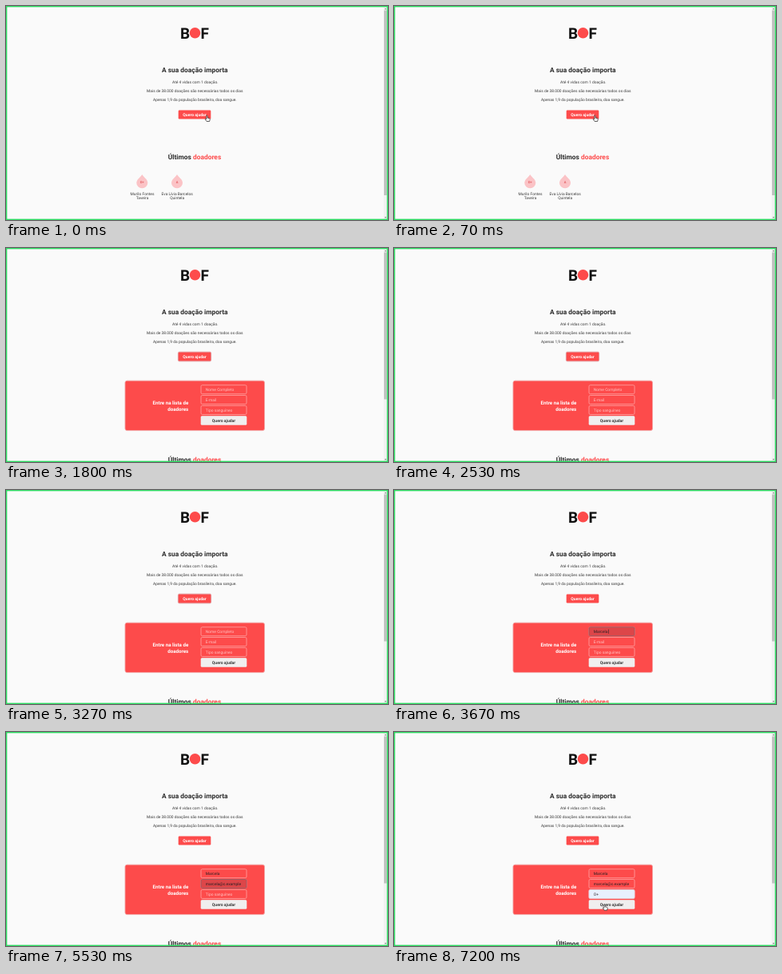
An HTML page that plays this animation: 478x268 px, repeating every 8 s.

```html
<!DOCTYPE html>
<html lang="pt-BR">
<head>
<meta charset="utf-8">
<title>Doadores</title>
<style>
  html, body { margin: 0; height: 100%; overflow: hidden; background: #fafafa; }
  svg { display: block; width: 478px; height: 268px; }
  text { font: 4.9px Roboto, sans-serif; fill: #3a3a3a; text-rendering: geometricPrecision; }
  .mid { text-anchor: middle; }
  .title { font-size: 8.4px; font-weight: 700; fill: #2b2b2b; }
  .logo { font-size: 19px; font-weight: 700; fill: #111; }
  .bold { font-size: 5.1px; font-weight: 700; }
  .lead { font-size: 6.2px; font-weight: 700; text-anchor: end; }
  .light { fill: #fff; }
  .hint { fill: #ffc4c4; }
  .value { fill: #2a2024; }
  .red { fill: #fd4b4b; }
  .blood { font-size: 4px; font-weight: 700; fill: #e25a5f; }
  .field { fill: none; stroke: #ffa3a3; stroke-width: .8; }
  .focus { fill: #dd4649; stroke: #8d5a63; }
  .filled { fill: #e8f0fe; stroke: #e3d5e2; }
</style>
</head>
<body>
<svg viewBox="0 0 478 268">
  <defs>
    <path id="drop" d="M0-8.5C2-5 7-2.5 7 2A7 6.7 0 0 1-7 2C-7-2.5-2-5 0-8.5Z" fill="#fbc3c6"/>
    <path id="hand" d="M-1.2 0Q-.5-.8.1 0V2.6L2.6 3.2Q3.4 3.5 3.2 4.6L2.6 7H-.9L-2.9 4.3Q-2.6 3.4-1.2 4.3Z"
      fill="#fff" stroke="#222" stroke-width=".7" stroke-linejoin="round"/>
    <rect id="box" width="57" height="11" rx="1.6"/>
  </defs>
  <rect width="478" height="268" fill="#fafafa"/>

  <text class="logo" x="218" y="40.5">B</text>
  <circle class="red" cx="236.5" cy="33.7" r="6.8"/>
  <text class="logo" x="243.6" y="40.5">F</text>

  <text class="title mid" x="236.3" y="83.3">A sua doação importa</text>
  <text class="mid" x="236.8" y="97">Até 4 vidas com 1 doação.</text>
  <text class="mid" x="236.3" y="108">Mais de 38.000 doações são necessárias todos os dias</text>
  <text class="mid" x="236.3" y="118.8">Apenas 1,9 da população brasileira, doa sangue.</text>

  <rect class="red" x="215.7" y="130.5" width="40.6" height="11" rx="1.2"/>
  <rect data-on="1" x="215.4" y="130.2" width="41.2" height="11.6" rx="1.4" fill="none" stroke="#d9757a" stroke-width=".7"/>
  <text class="bold light mid" x="236" y="137.7">Quero ajudar</text>

  <g id="donors">
    <text class="title mid" x="236" y="192">Últimos <tspan class="red">doadores</tspan></text>
    <use href="#drop" x="170.3" y="219.5"/>
    <use href="#drop" x="214" y="219.5"/>
    <text class="blood mid" x="170.3" y="222.3">O+</text>
    <text class="blood mid" x="214" y="222.3">A</text>
    <text class="mid" x="170.5" y="236.7">Murilo Fontes</text>
    <text class="mid" x="170.5" y="242.3">Taveira</text>
    <text class="mid" x="214.2" y="236.7">Eva Lívia Barcelos</text>
    <text class="mid" x="214.2" y="242.3">Quintela</text>
  </g>

  <g data-on="1234">
    <rect class="red" x="149" y="166.2" width="174.5" height="62.4" rx="2.5" stroke="#f3a5a5" stroke-width=".9"/>
    <text class="lead light" x="228.3" y="195.7">Entre na lista de</text>
    <text class="lead light" x="228.3" y="203.5">doadores</text>

    <use class="field" href="#box" x="244" y="171.7"/>
    <use class="field" href="#box" x="244" y="184.5"/>
    <use class="field" href="#box" x="244" y="197.5"/>
    <use class="field focus" data-on="2" href="#box" x="244" y="171.7"/>
    <use class="field focus" data-on="3" href="#box" x="244" y="184.5"/>
    <use class="field filled" data-on="4" href="#box" x="244" y="197.5"/>

    <text class="hint" data-on="1" x="249.8" y="179">Nome Completo</text>
    <text class="value" data-on="234" x="249.8" y="179">Marcela</text>
    <rect data-on="2" x="268.4" y="174.6" width=".6" height="5.2" fill="#2a2024"/>
    <text class="hint" data-on="12" x="249.8" y="191.8">E-mail</text>
    <text class="value" data-on="34" x="249.8" y="191.8">marcela@c.example</text>
    <text class="hint" data-on="123" x="249.8" y="204.8">Tipo sanguíneo</text>
    <text class="value" data-on="4" x="249.8" y="204.8">O+</text>

    <rect x="243.7" y="210.2" width="57.6" height="11.6" rx="1.6" fill="#f0efef"/>
    <text class="bold mid" x="272.5" y="217.8">Quero ajudar</text>
  </g>

  <use data-on="0" href="#hand" x="252" y="137.5"/>
  <use data-on="4" href="#hand" x="264" y="216.2"/>

  <rect x="472.6" width="4.4" height="268" fill="#f1f1f1"/>
  <rect id="thumb" x="473" y="5.5" width="3.6" fill="#c1c1c1"/>
  <path d="M473.6 4.2h2.6l-1.3-1.5zM473.6 264.2h2.6l-1.3 1.5z" fill="#777"/>
  <rect x=".6" y=".6" width="476.8" height="266.8" fill="none" stroke="#2edc63" stroke-width="1.5"/>
</svg>
<script>
  const LOOP = 8000, STEP = 1800;
  const parts = document.querySelectorAll('[data-on]');
  const donors = document.getElementById('donors');
  const thumb = document.getElementById('thumb');

  // Steps: landing, empty form, name, e-mail, blood type
  function draw() {
    const step = Math.floor(performance.now() % LOOP / STEP);
    for (const part of parts) {
      part.style.display = part.dataset.on.includes(step) ? '' : 'none';
    }
    donors.setAttribute('transform', `translate(0 ${step ? 76.3 : 0})`);
    thumb.setAttribute('height', step ? 184 : 231.5);
    requestAnimationFrame(draw);
  }
  draw();
</script>
</body>
</html>
```
